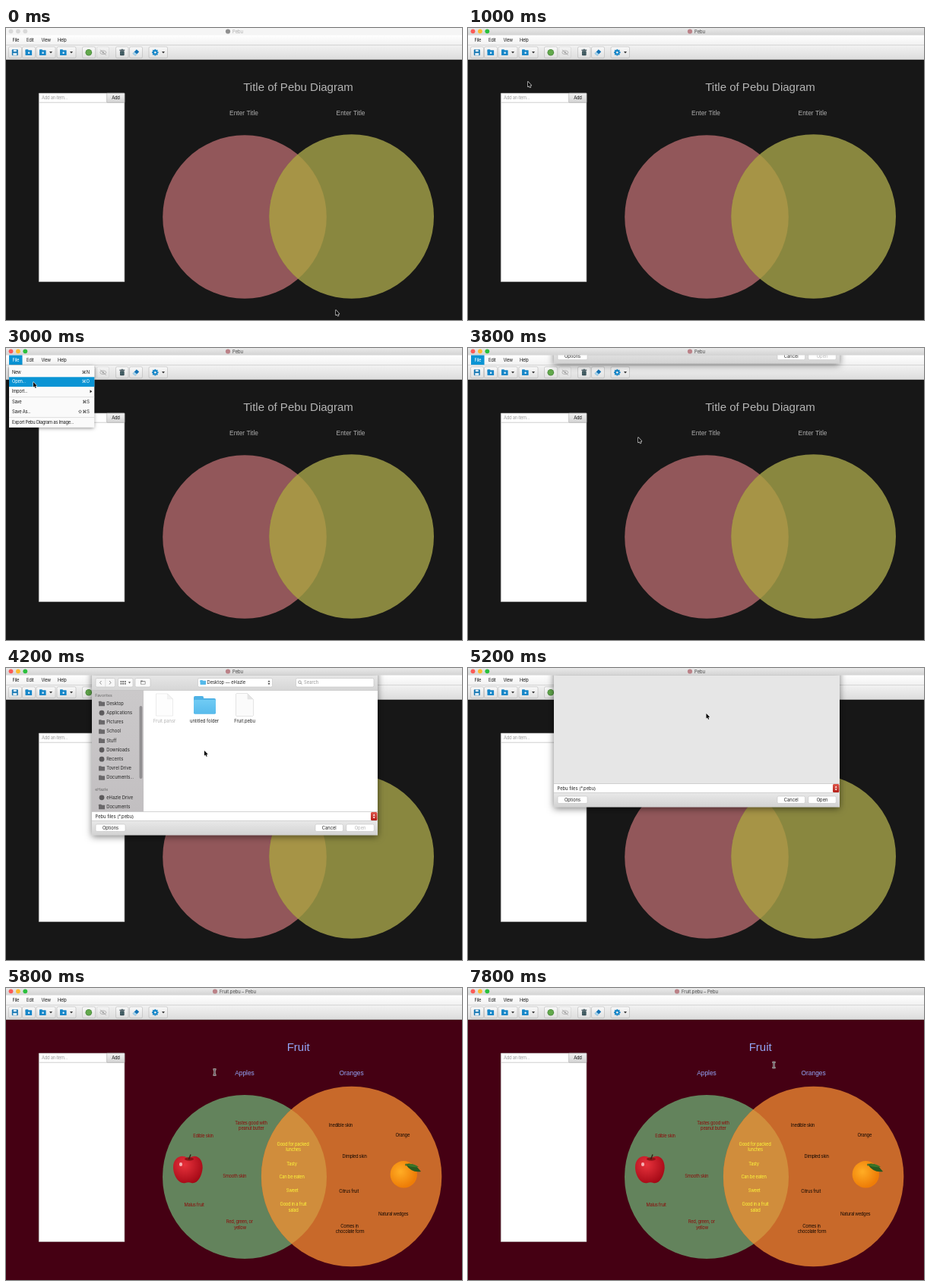
An HTML page with a canvas for the animation above (8 s loop, 600 by 385 pixels).

```html
<!DOCTYPE html>
<html lang="en">
<head>
<meta charset="utf-8">
<title>Pebu</title>
<style>
html, body { margin: 0; width: 100%; height: 100%; overflow: hidden; background: #171717; }
canvas { display: block; width: 600px; height: 385px; }
</style>
</head>
<body>
<canvas id="stage"></canvas>
<script>
const W = 600, H = 385, LOOP = 8000, STEP = 200;
const canvas = document.getElementById('stage');
const dpr = window.devicePixelRatio || 1;
canvas.width = W * dpr;
canvas.height = H * dpr;
const c = canvas.getContext('2d');
c.scale(dpr, dpr);

const BLUE = '#0a94d4', ICON = '#1878b4';
const UI = 'Inter, "Open Sans", sans-serif';
const HEAD = '"Liberation Sans", Arial, sans-serif';

// ---------- drawing helpers ----------
function rect(x, y, w, h, fill) {
  c.fillStyle = fill;
  c.fillRect(x, y, w, h);
}
function disc(x, y, r, fill) {
  c.beginPath();
  c.arc(x, y, r, 0, Math.PI * 2);
  c.fillStyle = fill;
  c.fill();
}
function poly(points, fill, stroke, width = 1) {
  c.beginPath();
  points.forEach(([x, y]) => c.lineTo(x, y));
  c.closePath();
  if (stroke) {
    c.strokeStyle = stroke;
    c.lineWidth = width;
    c.lineJoin = 'round';
    c.stroke();
  }
  if (fill) { c.fillStyle = fill; c.fill(); }
}
function line(x1, y1, x2, y2, color, width = 1) {
  c.beginPath();
  c.moveTo(x1, y1);
  c.lineTo(x2, y2);
  c.strokeStyle = color;
  c.lineWidth = width;
  c.stroke();
}
function shade(y, h, top, bottom) {
  const g = c.createLinearGradient(0, y, 0, y + h);
  g.addColorStop(0, top);
  g.addColorStop(1, bottom);
  return g;
}
function box(x, y, w, h, r, fill, border) {
  c.beginPath();
  c.roundRect(x, y, w, h, r);
  c.fillStyle = fill;
  c.fill();
  if (border) { c.strokeStyle = border; c.lineWidth = 0.6; c.stroke(); }
}
function shadowed(blur, y, draw) {
  c.save();
  c.shadowColor = 'rgba(0,0,0,.5)';
  c.shadowBlur = blur * dpr;
  c.shadowOffsetY = y * dpr;
  draw();
  c.restore();
}
function text(s, x, y, color, align, font, spacing) {
  c.font = font;
  c.letterSpacing = spacing + 'px';
  c.textAlign = align;
  c.textBaseline = 'middle';
  c.fillStyle = color;
  c.fillText(s, x, y);
}
const label = (s, x, y, color = '#1c1c1c', align = 'left') =>
  text(s, x, y, color, align, '5.8px ' + UI, -0.27);
const sysText = (s, x, y, color = '#222', align = 'left', size = 5.8) =>
  text(s, x, y, color, align, size + 'px ' + UI, 0);
const heading = (s, x, y, color, size) =>
  text(s, x, y, color, 'center', size + 'px ' + HEAD, 0);

function folder(x, y, w, h, fill) {
  box(x, y, w * 0.45, h * 0.4, h * 0.08, fill);
  box(x, y + h * 0.13, w, h * 0.87, h * 0.08, fill);
}

// ---------- window chrome ----------
function titleBar(active, title, left) {
  rect(0, 0, W, 10, active ? shade(0, 10, '#e9e9e9', '#d2d2d2') : '#f5f5f5');
  const lights = active ? ['#fc5b57', '#fdbb2e', '#2ac03d'] : ['#d9d9d9', '#d9d9d9', '#d9d9d9'];
  lights.forEach((col, i) => disc(6.5 + i * 9.4, 4.3, 2.9, col));
  disc(left - 6, 4.5, 3.1, active ? '#bb8288' : '#8f8f8f');
  sysText(title, left, 4.8, active ? '#444' : '#aaa');
}

function menuBar(open) {
  rect(0, 9.5, W, 13, shade(9.5, 13, '#ffffff', '#f1f1f1'));
  if (open) rect(4, 9.5, 17.5, 13, BLUE);
  ['File', 'Edit', 'View', 'Help'].forEach((s, i) =>
    label(s, [8.5, 27, 46.5, 68][i], 16.3, open && !i ? '#fff' : '#1c1c1c'));
}

const BUTTONS = [[3.5, 17, floppy], [21.5, 17, star], [40, 25, star], [67, 25, star],
  [100.5, 17, ready], [119.5, 16, eye], [144.5, 16.5, trash], [162.5, 17, eraser], [188, 24.5, gear]];

function toolBar() {
  rect(0, 22.5, W, 19, shade(22.5, 19, '#f2f2f2', '#dcdcdc'));
  rect(0, 22, W, 0.6, '#c9c9c9');
  rect(0, 41, W, 0.8, '#aaa');
  for (const [x, w, icon] of BUTTONS) {
    c.globalAlpha = icon === eye ? 0.45 : 1;
    box(x, 24.8, w, 14.8, 1.8, shade(25, 15, '#fafafa', '#dedede'), '#b5b5b5');
    icon(x + 8.3, 32.2);
    if (w > 20) poly([[x + 17, 31], [x + 21, 31], [x + 19, 33.5]], '#333');
    c.globalAlpha = 1;
  }
}
function floppy(x, y) {
  box(x - 4, y - 4, 8, 8, 1, ICON);
  rect(x - 2, y - 3.6, 4, 2.6, '#dcecf5');
  rect(x - 2.5, y + 0.8, 5, 3, '#dcecf5');
}
function star(x, y) {
  folder(x - 4.3, y - 4, 8.6, 7.8, '#1686c8');
  disc(x + 0.3, y + 0.6, 1.2, '#e4f3fb');
}
function ready(x, y) {
  disc(x, y, 4.3, '#47883a');
  disc(x, y, 3.4, '#63a94c');
}
function eye(x, y) {
  c.beginPath();
  c.ellipse(x, y, 4, 2.4, 0, 0, Math.PI * 2);
  c.strokeStyle = '#777';
  c.lineWidth = 1;
  c.stroke();
  disc(x, y, 1.3, '#777');
  line(x - 4, y - 3.6, x + 4, y + 3.6, '#777');
}
function trash(x, y) {
  rect(x - 3.4, y - 3.6, 6.8, 1.2, '#304850');
  rect(x - 1.2, y - 4.4, 2.4, 0.9, '#304850');
  box(x - 2.8, y - 2, 5.6, 6, 0.8, '#304850');
  for (const d of [-1.1, 1.1]) rect(x + d - 0.25, y - 1, 0.5, 4, '#8aa');
}
function eraser(x, y) {
  poly([[x - 4.2, y + 1.5], [x + 1, y - 4], [x + 4.4, y - 1], [x - 0.6, y + 4.2]], '#1573b5');
  poly([[x - 4.2, y + 1.5], [x - 2, y - 0.8], [x + 1.5, y + 2.2], [x - 0.6, y + 4.2]], '#a8d4ec');
}
function gear(x, y) {
  for (let i = 0; i < 4; i++) {
    const a = i * Math.PI / 4, dx = Math.cos(a) * 4.3, dy = Math.sin(a) * 4.3;
    line(x - dx, y - dy, x + dx, y + dy, '#1686c8', 1.8);
  }
  disc(x, y, 3.2, '#1686c8');
  disc(x, y, 1.3, '#eee');
}

// ---------- document ----------
function itemList() {
  box(43.3, 86, 112.6, 248.5, 0, '#fff', '#b8b8b8');
  rect(43.3, 97.8, 112.6, 0.7, '#bbb');
  label('Add an item...', 47, 92.3, '#9c9c9c');
  box(132.6, 86, 23.4, 12.3, 0.8, shade(86, 12, '#f2f2f2', '#d4d4d4'), '#aaa');
  label('Add', 144.4, 92.3, '#111', 'center');
}

function overlapPair(a, b, colors) {
  disc(...a, colors[0]);
  disc(...b, colors[1]);
  c.save();
  c.beginPath();
  c.arc(...a, 0, Math.PI * 2);
  c.clip();
  disc(...b, colors[2]);
  c.restore();
}

function emptyDoc() {
  rect(0, 41.8, W, H, '#171717');
  overlapPair([314, 249, 107.8], [454.7, 248.5, 108.3], ['#92575a', '#89873f', '#a69446']);
  heading('Title of Pebu Diagram', 384.5, 79, '#b5b5b5', 15);
  heading('Enter Title', 313, 112.8, '#adadad', 8.4);
  heading('Enter Title', 453.5, 112.8, '#adadad', 8.4);
}

const ITEMS = {
  '#8c0b0b': [['Tastes good with', 322.5, 178], ['peanut butter', 322.8, 185.7], ['Edible skin', 259.5, 195],
    ['Smooth skin', 300.7, 248.5], ['Malus fruit', 247.5, 286.5], ['Red, green, or', 307.3, 308.5], ['yellow', 308, 316.3]],
  '#fdf63a': [['Good for packed', 377.5, 205.8], ['lunches', 378, 213.6], ['Tasty', 376, 232], ['Can be eaten', 376, 249.4],
    ['Sweet', 376.6, 267], ['Good in a fruit', 378, 285], ['salad', 378, 292.8]],
  '#100803': [['Inedible skin', 440.5, 181], ['Orange', 521.7, 194.6], ['Dimpled skin', 458.6, 222.2], ['Citrus fruit', 451.2, 268.5],
    ['Natural wedges', 509.7, 298], ['Comes in', 452, 314], ['chocolate form', 452.5, 321.6]]
};

function fruitDoc() {
  rect(0, 41.8, W, H, '#450013');
  overlapPair([314, 249, 108], [454.6, 248.5, 118.7], ['#63835c', '#c8692a', '#d08d3c']);
  heading('Fruit', 384.7, 79, '#93a6f6', 15);
  heading('Apples', 314, 112.8, '#93a6f6', 8.4);
  heading('Oranges', 454.6, 112.8, '#93a6f6', 8.4);
  apple();
  orange();
  for (const color in ITEMS)
    for (const [s, x, y] of ITEMS[color]) label(s, x, y, color, 'center');
}

function glow(x, y, r, inner, outer) {
  const g = c.createRadialGradient(x, y, 1, x, y, r);
  g.addColorStop(0, inner);
  g.addColorStop(1, outer);
  return g;
}
function apple() {
  c.fillStyle = glow(235, 233, 27, '#e5303a', '#a20815');
  c.beginPath();
  c.moveTo(240, 225);
  c.bezierCurveTo(250, 217, 259, 225, 258.7, 237);
  c.bezierCurveTo(258, 249, 251, 259, 244, 257);
  c.quadraticCurveTo(240, 255.5, 236, 257);
  c.bezierCurveTo(228, 259, 220, 248, 220, 236);
  c.bezierCurveTo(220, 222, 233, 218, 240, 225);
  c.fill();
  c.beginPath();
  c.ellipse(241, 225.5, 6, 2.2, 0, 0, Math.PI * 2);
  c.fillStyle = '#8c1416';
  c.fill();
  line(240.5, 226, 243, 219.5, '#352016', 1.4);
  box(228, 230, 4, 5, 2, 'rgba(255,220,220,.75)');
}
function leaf(x1, y1, x2, y2, bend, fill) {
  c.beginPath();
  c.moveTo(x1, y1);
  c.quadraticCurveTo((x1 + x2) / 2, y1 - bend, x2, y2);
  c.quadraticCurveTo((x1 + x2) / 2 - 3, y2 + bend * 0.45, x1, y1);
  c.fillStyle = fill;
  c.fill();
}
function orange() {
  disc(523.3, 245.8, 17.7, glow(519, 242, 21, '#ffab23', '#ee7d07'));
  leaf(526, 232.5, 546, 242, 4, '#28591f');
  leaf(527, 233, 543, 236, 3, '#3d7528');
  disc(526.5, 233, 1.5, '#54702b');
}

// ---------- file menu ----------
const MENU = [['New', 32, '⌘N'], ['Open...', 44.6, '⌘O'], ['Import...', 57.3, ''],
  ['Save', 71.4, '⌘S'], ['Save As...', 84.2, '⇧⌘S'], ['Export Pebu Diagram as Image...', 98.2, '']];

function fileMenu(pointer, withSub) {
  const hover = MENU.findIndex(m => Math.abs(m[1] - pointer.y) < 6.4);
  shadowed(5, 1.5, () => rect(4, 22.8, 112.3, 82, '#fafafa'));
  rect(4, 64.5, 112.3, 0.6, '#cfcfcf');
  rect(4, 91.2, 112.3, 0.6, '#cfcfcf');
  MENU.forEach(([s, y, keys], i) => {
    const color = i === hover ? '#fff' : '#1c1c1c';
    if (i === hover) rect(4, y - 6.3, 112.3, 12.8, BLUE);
    label(s, 8, y, color);
    text(keys, 110, y, color, 'right', '5.8px Inter, "DejaVu Sans", sans-serif', 0);
    if (i === 2) poly([[110.5, y - 2], [113.3, y], [110.5, y + 2]], color);
  });
  if (hover !== 2 || !withSub) return;
  shadowed(5, 1.5, () => rect(116.5, 53, 40.7, 41, '#fafafa'));
  rect(116.5, 53, 40.7, 13, BLUE);
  ['Image', 'CSV File', 'Answer Key'].forEach((s, i) =>
    label(s, 120, 59.7 + i * 12.7, i ? '#1c1c1c' : '#fff'));
}

// ---------- open dialog ----------
const PLACES = [['Desktop', 47], ['Applications', 59.2], ['Pictures', 71.4], ['School', 83.6], ['Stuff', 95.8],
  ['Downloads', 108], ['Recents', 120.2], ['Tovrel Drive', 132.4], ['Documents...', 144.6],
  ['eHazle Drive', 170.8], ['Documents', 183]];
const ROUND = ['Applications', 'Downloads', 'Recents', 'eHazle Drive'];

function pushButton(s, x, y, w, color) {
  box(x, y, w, 9.5, 1.8, '#fff', '#c4c4c4');
  sysText(s, x + w / 2, y + 4.9, color, 'center');
}
function page(x, y, alpha) {
  c.globalAlpha = alpha;
  poly([[x, y], [x + 15, y], [x + 22, y + 7], [x + 22, y + 29], [x, y + 29]], '#fbfbfb', '#bbb', 0.8);
  poly([[x + 15, y], [x + 22, y + 7], [x + 15, y + 7]], '#e4e4e4', '#ccc', 0.4);
  c.globalAlpha = 1;
}
function chevrons(x, y, color) {
  poly([[x - 1.5, y - 0.8], [x + 1.5, y - 0.8], [x, y - 3]], color);
  poly([[x - 1.5, y + 0.8], [x + 1.5, y + 0.8], [x, y + 3]], color);
}

function browser(selected) {
  rect(113, 10, 376, 19.5, shade(10, 19, '#e6e6e6', '#d6d6d6'));
  box(118, 13.5, 25.5, 11.5, 1.8, '#f7f7f7', '#c2c2c2');
  line(130.8, 13.5, 130.8, 25, '#ccc', 0.6);
  for (const [x, d] of [[124.5, 1], [137, -1]]) {
    line(x + d, 17, x - d, 19.3, '#777', 0.8);
    line(x - d, 19.3, x + d, 21.6, '#777', 0.8);
  }
  box(147.5, 13.5, 19.5, 11.5, 1.8, '#fbfbfb', '#c2c2c2');
  for (let i = 0; i < 6; i++) rect(150.5 + i % 3 * 2.7, 17 + (i > 2) * 2.8, 1.8, 1.8, '#666');
  poly([[161, 18.3], [164, 18.3], [162.5, 20.6]], '#555');
  box(170, 13.5, 20, 11.5, 1.8, '#fbfbfb', '#c2c2c2');
  folder(177, 16.6, 6.5, 5, '#777');
  rect(177.7, 18.2, 5.1, 2.7, '#fbfbfb');
  box(252.5, 13.5, 98, 11.5, 1.8, '#fff', '#c2c2c2');
  folder(255.5, 16, 7.5, 6, '#55b9ea');
  sysText('Desktop — eHazle', 264.5, 19.5);
  chevrons(346, 19.3, '#444');
  box(381.5, 13.5, 102.5, 11.5, 1.8, '#fff', '#c2c2c2');
  c.beginPath();
  c.arc(386.5, 18.7, 1.8, 0, Math.PI * 2);
  c.strokeStyle = '#777';
  c.lineWidth = 0.7;
  c.stroke();
  line(387.8, 20, 389.3, 21.6, '#777', 0.8);
  sysText('Search', 392, 19.5, '#999');

  rect(113, 29.5, 68, 160, shade(29, 160, '#cbc9ca', '#c2bfc1'));
  rect(181, 29.5, 308, 160, '#fff');
  rect(113, 29.2, 376, 0.6, '#bdbdbd');
  sysText('Favorites', 117.3, 36.3, '#666', 'left', 5.2);
  sysText('eHazle', 117.3, 160.2, '#666', 'left', 5.2);
  for (const [s, y] of PLACES) {
    if (ROUND.includes(s)) disc(126, y, 3.4, '#5c5a5c');
    else folder(122, y - 3.2, 8, 6.4, '#6a686a');
    sysText(s, 132.2, y, '#252525');
  }
  box(175.5, 50, 3.8, 96, 1.9, '#908e90');

  if (selected) {
    box(297.5, 32, 33, 33, 2, '#dcdcdc');
    box(298.5, 66, 31, 8, 1.6, '#1765d6');
  }
  page(197.5, 34, 0.4);
  page(303, 34, 1);
  folder(247, 37, 29, 23.5, '#4fb2e5');
  box(247, 42, 29, 18.5, 1.2, shade(42, 18, '#70cbf4', '#58bbec'));
  sysText('Fruit.pansr', 208.5, 70.3, '#b3b3b3', 'center');
  sysText('untitled folder', 261, 70.3, '#222', 'center');
  sysText('Fruit.pebu', 314, 70.3, selected ? '#fff' : '#222', 'center');
}

function dialog(offset, loaded, selected) {
  c.save();
  c.beginPath();
  c.rect(0, 9.6, W, H);
  c.clip();
  c.translate(0, offset);
  shadowed(9, 3, () => rect(113, 0, 376, 220.3, '#e6e6e6'));
  if (loaded) browser(selected);
  rect(113, 189.5, 376, 11.8, '#fff');
  rect(113, 189.3, 376, 0.6, '#bbb');
  sysText('Pebu files (*.pebu)', 117.5, 195.8);
  box(480, 190, 8.5, 11, 1.5, shade(190, 11, '#dd5549', '#b51f19'));
  chevrons(484.2, 195.5, '#fff');
  rect(113, 201.3, 376, 19, shade(201, 19, '#e9e9e9', '#d3d3d3'));
  rect(113, 201, 376, 0.6, '#c4c4c4');
  pushButton('Options', 118, 206, 39, '#222');
  pushButton('Cancel', 407, 206, 36.5, '#222');
  pushButton('Open', 447.8, 206, 36.5, selected ? '#222' : '#b5b5b5');
  c.restore();
}

// ---------- pointer ----------
const PATH = [[0, 434, 372], [400, 434, 372], [1200, 13, 15], [1400, 13, 15], [1800, 38, 57], [2000, 40, 58.5],
  [2600, 40, 58], [2800, 36, 45], [3400, 36, 45], [3800, 224, 118], [4200, 261, 109], [4600, 313, 58],
  [5200, 313.5, 60], [5800, 274.5, 111], [6400, 274.5, 111], [7600, 402.5, 101.5], [8000, 402.5, 101.5]];

function pointerAt(t) {
  const i = PATH.findIndex(k => k[0] > t);
  const [t0, x0, y0] = PATH[i - 1], [t1, x1, y1] = PATH[i];
  const u = (t - t0) / (t1 - t0), e = u * u * (3 - 2 * u);
  return { x: x0 + (x1 - x0) * e, y: y0 + (y1 - y0) * e };
}
function arrow({ x, y }) {
  const shape = [[0, 0], [0, 6.6], [1.5, 5.3], [2.6, 7.7], [3.7, 7.2], [2.6, 4.9], [4.6, 4.8]];
  poly(shape.map(([a, b]) => [x + a, y + b]), '#000', '#e8e8e8', 1.2);
}
function textCursor({ x, y }) {
  for (const [color, w] of [['#eee', 2], ['#333', 0.8]]) {
    line(x, y - 3.5, x, y + 3.5, color, w);
    line(x - 2, y - 3.7, x + 2, y - 3.7, color, w);
    line(x - 2, y + 3.7, x + 2, y + 3.7, color, w);
  }
}

// ---------- timeline ----------
const SLIDE = { 3800: -200, 4000: -45, 5200: -37, 5400: -150 };

function draw(t) {
  const opened = t >= 5600;
  const pointer = pointerAt(t);
  opened ? fruitDoc() : emptyDoc();
  itemList();
  titleBar(t >= 800, opened ? 'Fruit.pebu – Pebu' : 'Pebu', opened ? 281 : 298);
  menuBar(t >= 1400 && t <= 3800);
  toolBar();
  if (t >= 1400 && t < 3600) fileMenu(pointer, t >= 1800);
  if (t >= 3800 && !opened) dialog(SLIDE[t] || 0, t >= 4200 && t < 5200, t >= 4600);
  if (t >= 5800) textCursor(pointer);
  else arrow(pointer);
}

const start = performance.now();
function tick() {
  const t = (performance.now() - start) % LOOP;
  draw(Math.floor(t / STEP) * STEP);
  requestAnimationFrame(tick);
}
tick();
</script>
</body>
</html>
```
